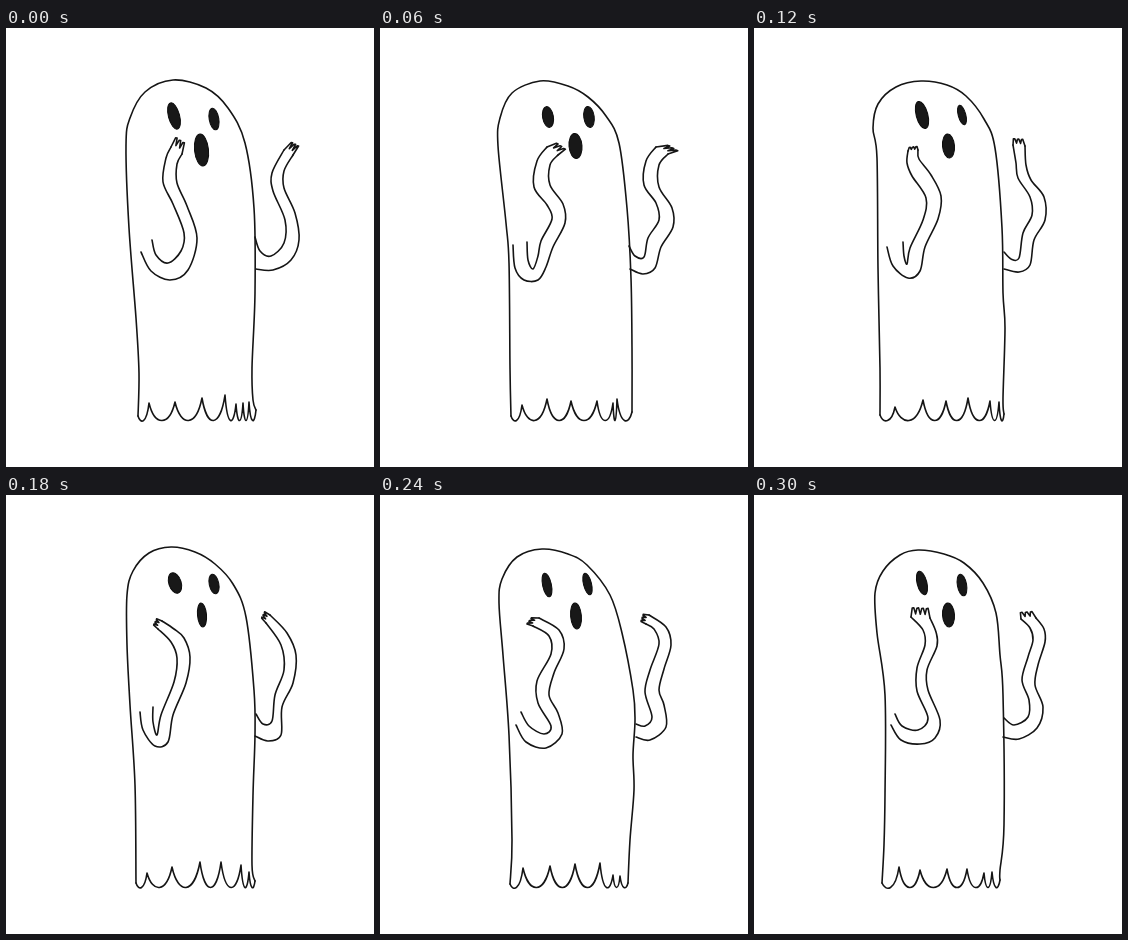
An HTML page that plays this animation: 368x439 px, repeating every 0.36 s.

```html
<!DOCTYPE html>
<html lang="en">
<head>
<meta charset="utf-8">
<title>Waving ghost</title>
<style>
  html, body { margin: 0; width: 100%; height: 100%; overflow: hidden; background: #fff; }
  svg { display: block; width: 100%; height: 100%; }
  path { fill: none; stroke: #151515; stroke-width: 1.6; stroke-linecap: round; stroke-linejoin: round; }
  ellipse { fill: #181818; stroke: #0c0c0c; stroke-width: 1; }
</style>
</head>
<body>
<svg id="stage" viewBox="0 0 368 439"></svg>
<script>
const HOLD = 60;
const FLOOR = 392.5;
const stage = document.getElementById('stage');
const poses = [];

function add(parent, tag, attrs = {}) {
  const el = document.createElementNS('http://www.w3.org/2000/svg', tag);
  for (const k in attrs) el.setAttribute(k, attrs[k]);
  parent.appendChild(el);
  return el;
}

const points = text => text.split(' ').map(p => p.split(',').map(Number));
const mix = (a, b, t) => [a[0] + (b[0] - a[0]) * t, a[1] + (b[1] - a[1]) * t];
const fmt = p => p.map(v => v.toFixed(1)).join(' ');

// Smooth curve through all points
function curve(pts) {
  let d = 'M' + fmt(pts[0]);
  for (let i = 0; i < pts.length - 1; i++) {
    const p = pts[i], q = pts[i + 1];
    const before = pts[i - 1] || p, after = pts[i + 2] || q;
    const c1 = [p[0] + (q[0] - before[0]) / 6, p[1] + (q[1] - before[1]) / 6];
    const c2 = [q[0] - (after[0] - p[0]) / 6, q[1] - (after[1] - p[1]) / 6];
    d += `C${fmt(c1)} ${fmt(c2)} ${fmt(q)}`;
  }
  return d;
}

// Scallops hanging between neighbouring peaks
function scallops(pts) {
  let d = 'M' + fmt(pts[0]);
  for (let i = 1; i < pts.length; i++) {
    const p = pts[i - 1], q = pts[i], w = (q[0] - p[0]) * 0.22;
    const y = FLOOR + (FLOOR - (p[1] + q[1]) / 2) / 3;
    d += `C${fmt([p[0] + w, y])} ${fmt([q[0] - w, y])} ${fmt(q)}`;
  }
  return d;
}

// Fingers fanned between both wrist ends
function fingers(a, b, tip, n) {
  const mid = mix(a, b, 0.5);
  const reach = [tip[0] - mid[0], tip[1] - mid[1]];
  const at = (t, k) => {
    const p = mix(a, b, t);
    return [p[0] + reach[0] * k, p[1] + reach[1] * k];
  };
  let d = 'M' + fmt(a);
  for (let i = 0; i < n; i++) {
    d += 'L' + fmt(at((i + 0.35) / n, 0.95)) + 'L' + fmt(at((i + 0.7) / n, 1));
    d += 'L' + fmt(i < n - 1 ? at((i + 1) / n, 0.35) : b);
  }
  return d;
}

function pose({ body, hem, arms, face }) {
  const g = add(stage, 'g', { visibility: 'hidden' });
  const line = d => add(g, 'path', { d });
  const side = points(body);
  line(curve(side));
  line(scallops([side[0], ...points(hem), side[side.length - 1]]));
  for (const { outer, inner, tip, n } of arms) {
    const o = points(outer), i = points(inner);
    line(curve(o));
    line(curve(i));
    line(fingers(i[i.length - 1], o[o.length - 1], tip, n));
  }
  for (const [cx, cy, rx, ry, turn] of face) {
    add(g, 'ellipse', { cx, cy, rx, ry, transform: `rotate(${turn} ${cx} ${cy})` });
  }
  poses.push(g);
}

pose({
  body: '132,388 133,345 130,290 123,200 120,118 124,90 139,64 167,52 200,60 222,80 239,115 248,180 249,265 246,340 247,372 250,382',
  hem: '143,375 169,374 196,370 219,367 230,376 237,375 243,374',
  arms: [
    { outer: '135,224 145,243 164,252 182,242 191,210 181,178 171,155 171,136 176,126',
      inner: '146,212 150,227 162,235 175,223 178,205 167,176 157,154 160,130 165,119', tip: [174, 112], n: 3 },
    { outer: '250,241 267,242 285,232 293,212 289,185 278,160 278,143 287,127',
      inner: '249,209 254,223 265,228 278,215 279,192 267,163 266,145 278,122', tip: [289, 116], n: 3 }
  ],
  face: [[168, 88, 5.6, 13.5, -15], [208, 91, 4.8, 11, -10], [195.5, 122, 7, 16, -6]]
});

pose({
  body: '131,388 130,340 129,235 126,195 118,118 120,90 132,65 160,53 188,58 208,69 226,88 239,115 247,180 251,250 252,320 252,384',
  hem: '142,377 167,371 191,373 217,373 233,375 237,371',
  arms: [
    { outer: '133,217 135,240 144,252 158,252 166,239 173,219 185,195 183,176 170,157 170,137 178,127',
      inner: '147,214 148,232 153,241 158,228 161,213 172,191 167,177 154,159 157,133 167,119', tip: [181, 118], n: 3 },
    { outer: '250,241 263,246 275,240 281,219 293,199 292,180 279,159 279,137 288,126',
      inner: '249,218 255,228 264,229 268,210 279,192 276,175 264,157 266,133 276,119', tip: [293, 120], n: 3 }
  ],
  face: [[168, 89, 5.4, 10.5, -10], [209, 89, 5.2, 10.5, -8], [195.5, 118, 6.5, 12.5, -5]]
});

pose({
  body: '126,387 126,340 124,240 123,130 119,100 124,76 142,59 167,53 193,57 212,68 230,91 241,120 248,200 249,265 251,300 249,370 250,386',
  hem: '141,379 169,372 192,373 214,370 236,373 245,374',
  arms: [
    { outer: '133,219 139,238 154,250 166,243 171,219 184,191 187,168 177,147 165,131 164,122',
      inner: '149,214 150,228 153,236 156,220 169,192 172,170 158,148 153,135 154,123', tip: [159, 119], n: 3 },
    { outer: '250,241 265,244 276,237 280,212 291,192 290,169 277,152 272,137 271,118',
      inner: '250,224 257,231 265,230 269,205 278,187 276,169 264,150 262,135 259,117', tip: [264, 111], n: 3 }
  ],
  face: [[168, 87, 5.8, 14, -15], [208, 87, 3.8, 10, -15], [194.5, 118, 6, 12, -5]]
});

pose({
  body: '130,388 129,290 124,210 121,150 121,100 127,76 143,58 165,52 189,57 209,69 227,89 240,122 248,195 249,240 247,300 246,370 249,386',
  hem: '141,378 166,372 194,367 215,367 235,370 243,377',
  arms: [
    { outer: '134,217 137,235 149,251 162,247 167,220 180,188 184,162 178,143 168,134 156,126',
      inner: '147,212 147,227 151,240 155,220 168,187 171,163 165,147 152,134', tip: [149, 127], n: 3 },
    { outer: '249,241 262,246 275,240 276,212 287,188 290,160 281,138 264,120',
      inner: '250,219 257,229 266,226 269,200 278,175 275,150 260,128', tip: [257, 120], n: 3 }
  ],
  face: [[169, 88, 6.2, 10.5, -18], [208, 89, 4.8, 10, -12], [196, 120, 4.5, 12, -5]]
});

pose({
  body: '130,389 132,345 129,240 123,160 119,108 122,84 137,62 162,54 188,59 207,70 230,100 242,138 253,195 255,225 253,260 254,295 250,345 248,388',
  hem: '143,373 170,371 195,369 220,368 233,380 240,381',
  arms: [
    { outer: '136,230 146,247 166,253 182,239 178,218 169,200 174,178 184,154 179,135 159,123',
      inner: '141,217 149,231 164,239 171,231 158,208 157,186 171,159 169,141 153,131', tip: [149, 126], n: 3 },
    { outer: '256,242 270,245 286,232 284,210 279,195 284,174 291,150 286,132 269,120',
      inner: '256,229 265,231 272,222 265,197 270,175 279,149 274,134 266,129', tip: [262, 123], n: 3 }
  ],
  face: [[167, 90, 4.4, 12, -12], [207.5, 89, 4, 11, -14], [196, 121, 5.4, 13, -5]]
});

pose({
  body: '128,388 130,350 131,300 131,200 123,138 121,98 129,76 146,60 164,55 190,59 210,68 229,88 242,118 246,160 249,200 250,330 246,375 246,385',
  hem: '145,372 166,375 193,374 213,374 230,378 238,377',
  arms: [
    { outer: '137,230 147,245 166,249 181,243 186,225 174,195 173,175 183,151 182,137 176,123',
      inner: '141,219 148,231 164,235 174,223 163,196 163,173 171,150 169,135 157,122', tip: [166, 113], n: 4 },
    { outer: '249,242 265,244 283,233 289,212 281,190 284,170 291,147 290,134 282,123',
      inner: '250,223 260,230 274,222 275,205 268,185 274,162 279,145 276,133 267,124', tip: [272, 117], n: 3 }
  ],
  face: [[168, 88, 4.9, 12, -14], [208, 90, 4.6, 11, -10], [194.5, 120, 6, 12, -4]]
});

let shown = -1;
function draw(now) {
  const i = Math.floor(now / HOLD) % poses.length;
  if (i !== shown) {
    poses.forEach((g, k) => g.setAttribute('visibility', k === i ? 'visible' : 'hidden'));
    shown = i;
  }
}

let start;
function tick(now) {
  start ??= now;
  draw(now - start);
  requestAnimationFrame(tick);
}
draw(0);
requestAnimationFrame(tick);
</script>
</body>
</html>
```
